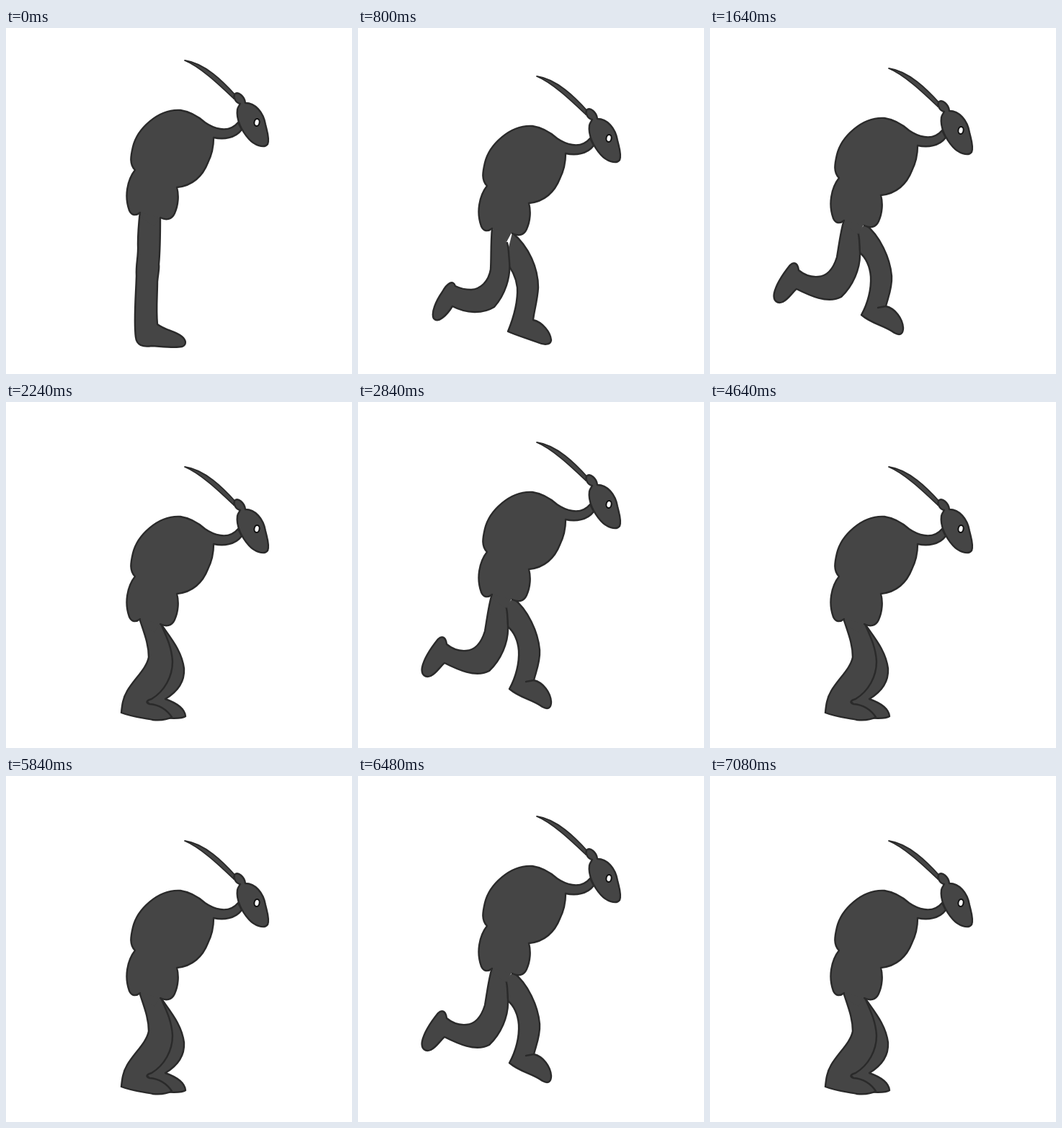
Animation, 480 px wide and 480 px high, one loop 7.28 s. Source, as an HTML page without scripts:

```html
<!DOCTYPE html>
<html lang="en">
<head>
<meta charset="utf-8">
<title>Walking creature</title>
<style>
  html, body { margin: 0; width: 100%; height: 100%; overflow: hidden; background: #fff; }
  svg { display: block; width: 480px; height: 480px; overflow: hidden; }
  .ink { fill: #454545; stroke: #2a2a2a; stroke-width: 2.4; stroke-linejoin: round; stroke-linecap: round; }
  .horn { stroke-width: 1.8; }
  .hip { stroke: none; }
  .eye { fill: #fff; stroke: #111; stroke-width: 2; }
  #film { animation: walk 7280ms infinite; }

  /* 36 held poses of 200 ms; two of them last 240 ms */
  @keyframes walk {
    0%       { transform: translateX(0);        animation-timing-function: steps(3); }
    8.24175% { transform: translateX(-1440px);  animation-timing-function: steps(1); }
    11.5384% { transform: translateX(-1920px);  animation-timing-function: steps(29); }
    91.2087% { transform: translateX(-15840px); animation-timing-function: steps(1); }
    94.5054% { transform: translateX(-16320px); animation-timing-function: steps(2); }
    100%     { transform: translateX(-17280px); }
  }
</style>
</head>
<body>
<svg viewBox="0 0 480 480">
  <defs>
    <g id="body">
      <path class="hip" d="M186 253L189 264L206 275L213 262V250Z"/>
      <path class="horn" d="M248 45C276 49 301 74 319 94L316 98C297 80 270 54 248 45Z"/>
      <path d="M186 256C180 261 174 260 171 253C164 234 168 211 179 197C171 189 173 178 176 165C182 140 211 112 242 114C255 116 268 124 276 131C286 138 308 148 322 131L327 141C318 153 302 155 288 152C288 163 286 175 280 187C273 205 259 219 237 221C240 232 239 246 234 257C230 266 222 267 214 263"/>
      <path d="M317 92C322 87 331 95 332 104C346 104 357 117 360 134C362 143 366 154 363 161C358 168 344 162 337 154C327 143 319 127 321 113C322 109 324 107 325 105C319 104 315 97 317 92Z"/>
      <ellipse class="eye" cx="348" cy="131" rx="3.6" ry="5" transform="rotate(10 348 131)"/>
    </g>

    <g id="strip" class="ink">
      <!-- upright -->
      <g>
        <path d="M186 254C184 272 183 286 183 300C184 318 180 326 181 344C180 374 177 408 180 429C181 440 190 443 202 441C218 442 234 444 244 442C251 440 250 433 244 428C234 420 222 420 210 411C208 390 210 370 210 352C211 340 213 334 212 328C214 306 214 284 214 263"/>
        <use href="#body"/>
      </g>
      <!-- lifting the rear foot -->
      <g transform="translate(480)">
        <path d="M214 268C228 294 234 326 232 352C230 376 228 394 230 407C242 411 255 422 256 432C256 439 248 440 238 436C223 432 207 429 198 425C200 402 204 376 203 350C203 330 200 312 197 300"/>
        <path d="M186 260C184 292 181 328 173 350C167 362 154 370 143 370C136 362 129 367 122 380C113 394 106 410 110 417C116 423 130 413 140 399C160 404 180 396 190 380C202 358 208 320 207 280"/>
        <use href="#body" y="5"/>
      </g>
      <!-- leap -->
      <g transform="translate(960)">
        <path d="M215 272C236 288 250 320 252 344C253 360 247 374 244 386C257 389 267 403 268 416C268 425 263 427 256 423C241 412 225 411 210 398C219 382 224 362 223 345C222 331 216 318 208 312L205 283M233 388L244 386"/>
        <path d="M186 266C181 282 179 301 176 318C172 331 164 344 150 345C138 346 129 341 123 336C122 327 117 323 111 329C103 339 92 354 89 368C87 379 94 383 101 380C109 376 114 367 120 362C138 371 163 383 182 373C198 358 209 334 208 311C207 300 208 291 205 283"/>
        <use href="#body" y="11"/>
      </g>
      <!-- reaching for the ground -->
      <g transform="translate(1440)">
        <path d="M214 284C238 304 250 334 250 360C249 378 244 394 243 405C256 408 267 422 268 433C267 440 258 440 249 436C234 430 221 427 208 421C217 399 222 380 221 360C219 345 212 332 204 324"/>
        <path d="M186 278C184 299 185 319 184 335C181 352 170 362 157 363C149 363 141 361 135 358C132 348 123 355 117 366C108 379 101 395 105 403C111 410 123 399 131 386C150 396 173 397 189 387C204 370 212 346 210 324C209 313 209 305 207 298"/>
        <use href="#body" y="22"/>
      </g>
      <!-- sinking -->
      <g transform="translate(1920)">
        <path d="M215 298C237 319 249 343 250 367C250 386 240 401 234 410C245 414 257 427 257 436C255 442 242 440 231 437C218 435 207 430 200 425C215 405 224 387 223 366C221 349 214 339 207 330"/>
        <path d="M186 293C189 312 193 329 192 345C190 363 176 376 165 383C157 385 151 395 146 408C140 421 138 433 144 437C153 440 164 428 169 416C188 413 209 394 218 372C223 352 220 327 213 304"/>
        <use href="#body" y="36"/>
      </g>
      <!-- crouch -->
      <g transform="translate(2400)">
        <path d="M215 308C228 327 244 345 247 370C248 389 236 403 221 412C235 417 248 425 249 436C244 440 230 439 218 438L195 415L215 340Z"/>
        <path d="M185 300C191 319 198 335 198 354C195 370 178 384 168 401C162 411 161 421 160 431C175 437 190 438 204 441C216 442 225 440 230 437C223 427 213 420 199 419C193 417 195 414 202 412C220 401 231 381 231 360C230 340 222 324 215 308"/>
        <use href="#body" y="45"/>
      </g>
    </g>
  </defs>

  <g id="film">
    <use href="#strip"/>
    <use href="#strip" x="2880"/>
    <use href="#strip" x="5760"/>
    <use href="#strip" x="8640"/>
    <use href="#strip" x="11520"/>
    <use href="#strip" x="14400"/>
  </g>
</svg>
</body>
</html>
```
